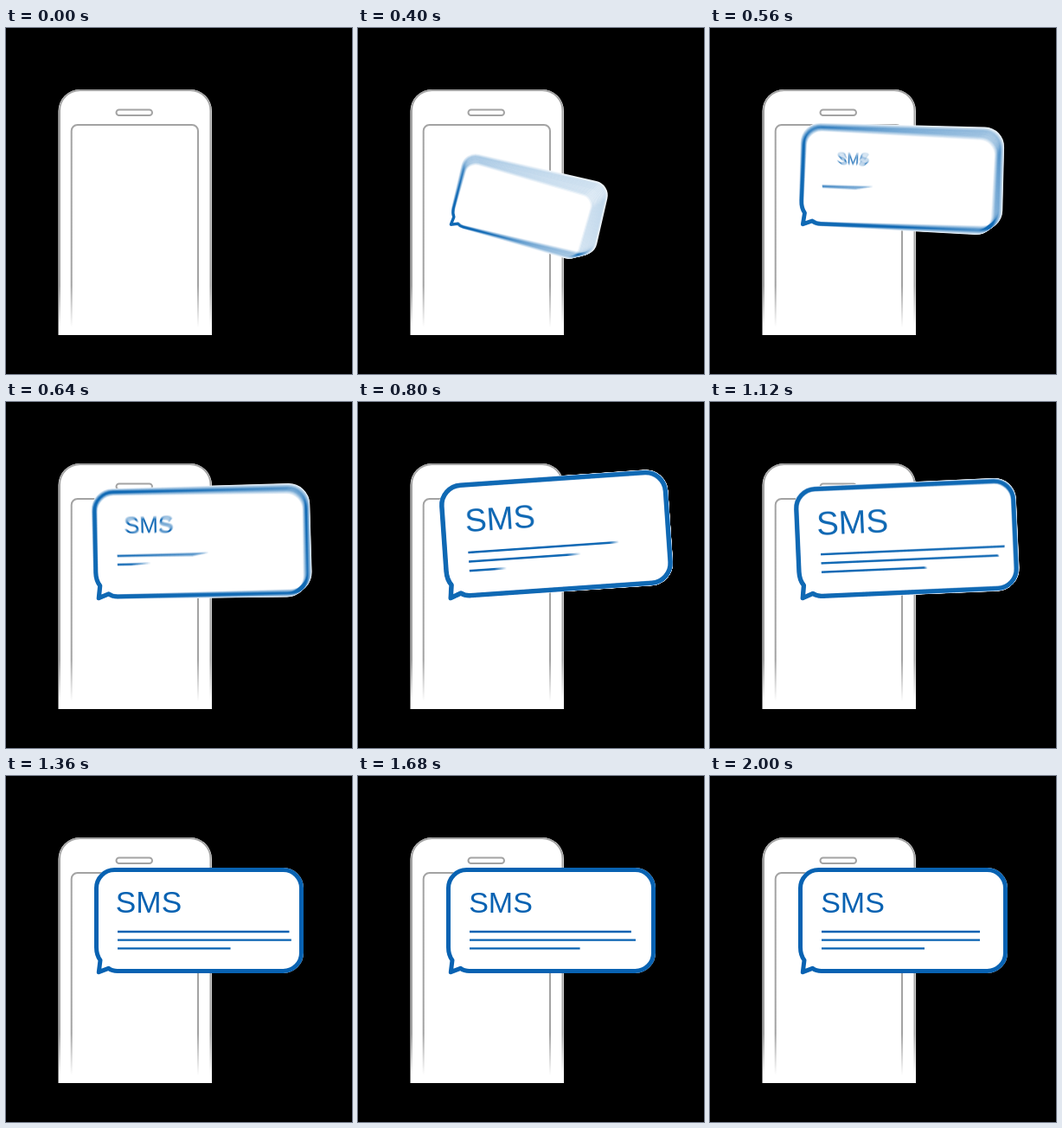
An HTML page that plays this animation: 400 by 400 pixels, repeating every 2.88 s.

```html
<!DOCTYPE html>
<html lang="en">
<head>
<meta charset="utf-8">
<title>SMS</title>
<style>
  html, body { margin: 0; width: 100%; height: 100%; overflow: hidden; background: #000; }
  svg { display: block; width: 100%; height: 100%; }
  #ink { isolation: isolate; }
  #ink > g { mix-blend-mode: plus-lighter; }
  text { font: 34px "Liberation Sans", Arial, sans-serif; text-anchor: middle; }
</style>
</head>
<body>
<svg viewBox="0 0 400 400">
  <defs>
    <linearGradient id="fade" gradientUnits="userSpaceOnUse" x1="0" y1="298" x2="0" y2="346">
      <stop offset="0" stop-color="#a3a3a3"/>
      <stop offset="1" stop-color="#fff"/>
    </linearGradient>
    <path id="shape" stroke-linejoin="round" d="M129 225.500H320.500a21 21 0 0 0 21-21V129.500a21 21 0 0 0-21-21H125.500a21 21 0 0 0-21 21V198Q104.500 207 109 213L107.300 226.700L118.500 222.300Q122.500 225.500 129 225.500Z"/>
  </defs>
  <path fill="#fff" d="M60.500 355V96a25 25 0 0 1 25-25H213a25 25 0 0 1 25 25V355Z"/>
  <g fill="none" stroke="url(#fade)" stroke-width="2">
    <path d="M62 350V95.500a23.500 23.500 0 0 1 23.500-23.500H213a23.500 23.500 0 0 1 23.500 23.500V350"/>
    <path d="M75.700 350V119a7 7 0 0 1 7-7H215a7 7 0 0 1 7 7V350"/>
    <rect x="127.500" y="94.500" width="41.500" height="6.500" rx="3.250"/>
  </g>
  <g id="paper" fill="#fff" stroke="#fff" stroke-width="5"></g>
  <g id="ink"></g>
</svg>
<script>
const LOOP = 2880, STEP = 80, START = 240, SETTLED = 2000;
const SAMPLES = 15, SHUTTER = 32, BLUR_END = 1360;
const BLUE = '#0862b2';

const progress = (t, from, to) => Math.min(1, Math.max(0, (t - from) / (to - from)));
const grow = (t, from, to) => 1 - (1 - progress(t, from, to)) ** 2.4;
const relax = (t, from, to) => progress(t, from, to) ** 1.6;

// Grows from 0 past 1 by the overshoot, then eases back to 1.
const pop = (t, start, peak, end, overshoot) =>
  (1 + overshoot) * grow(t, start, peak) - overshoot * relax(t, peak, end);

const bubbleScale = t => pop(t, 180, 840, 1360, .095);
const bubbleAngle = t => 45 - 49 * grow(t, 180, 840) + 4 * relax(t, 840, 1360);
const textScale = t => pop(t, 440, 960, 1600, .07);

function ruleLength(t, index, length) {
  const start = 480 + 120 * index;
  return length * pop(t, start, start + 700, start + 1280, .1);
}

function add(parent, tag, attrs = {}) {
  const el = document.createElementNS('http://www.w3.org/2000/svg', tag);
  for (const name in attrs) el.setAttribute(name, attrs[name]);
  return parent.appendChild(el);
}

const ruleWidths = [183, 183, 119];
const paper = document.getElementById('paper');
const ink = document.getElementById('ink');
const copies = Array.from({ length: SAMPLES }, () => {
  const sheet = add(paper, 'use', { href: '#shape' });
  const group = add(ink, 'g');
  const body = add(group, 'g', { fill: 'none', stroke: BLUE });
  add(body, 'use', { href: '#shape', 'stroke-width': 5 });
  const label = add(body, 'text', { y: 12, fill: BLUE, stroke: 'none' });
  label.textContent = 'SMS';
  const rules = ruleWidths.map(() => add(body, 'path', { 'stroke-width': 2.3 }));
  return { sheet, group, body, label, rules };
});

function pose(copy, t) {
  const place = `translate(107 228) rotate(${bubbleAngle(t)}) scale(${bubbleScale(t)}) translate(-107 -228)`;
  copy.sheet.setAttribute('transform', place);
  copy.body.setAttribute('transform', place);
  copy.label.setAttribute('transform', `translate(165 146) scale(${textScale(t)})`);
  copy.rules.forEach((rule, i) => {
    rule.setAttribute('d', `M129 ${180 + 9.7 * i}h${ruleLength(t, i, ruleWidths[i])}`);
  });
}

// Motion blur: the ink of several poses within the shutter time is averaged.
function render(time) {
  const t = Math.min(Math.floor(time % LOOP / STEP) * STEP, SETTLED);
  const count = t < START ? 0 : t < BLUR_END ? SAMPLES : 1;
  copies.forEach((copy, i) => {
    const display = i < count ? 'inline' : 'none';
    copy.sheet.style.display = copy.group.style.display = display;
    if (i >= count) return;
    copy.group.style.opacity = 1 / count;
    pose(copy, count === 1 ? t : t + SHUTTER * (i / (count - 1) - .5));
  });
}

const began = performance.now();
function tick() {
  render(performance.now() - began);
  requestAnimationFrame(tick);
}
tick();
</script>
</body>
</html>
```
